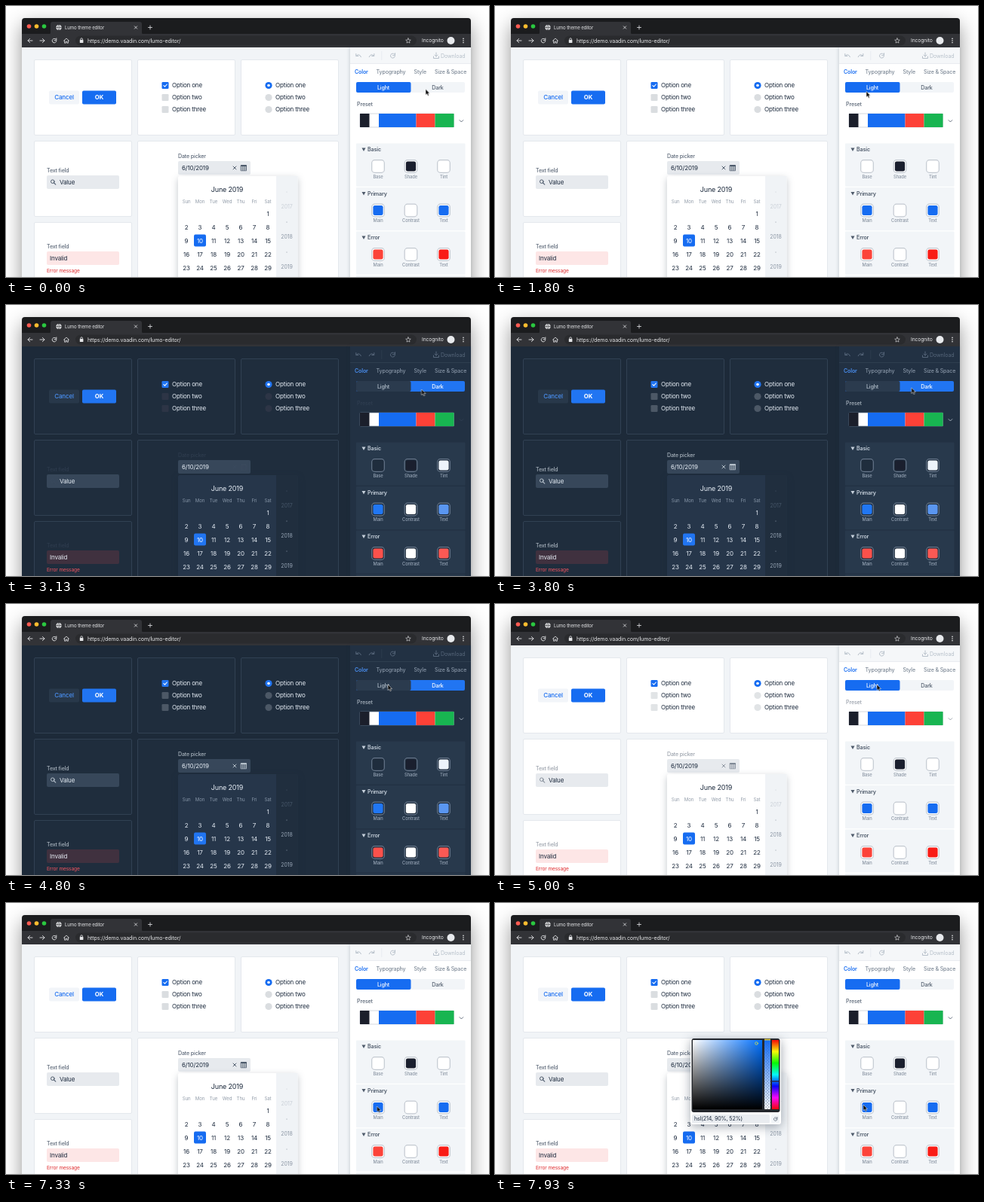
Animation, 640 px wide and 360 px high, one loop 8000 ms. Source, as an HTML page:

```html
<!DOCTYPE html>
<html lang="en">
<head>
<meta charset="utf-8">
<title>Theme editor</title>
<style>
@property --label { syntax: '<color>'; inherits: true; initial-value: rgba(27,43,65,.72); }
@property --box { syntax: '<color>'; inherits: true; initial-value: rgba(27,43,65,.16); }

html, body { margin: 0; width: 100%; height: 100%; overflow: hidden; background: #fff; }
svg { display: block; width: 640px; height: 360px; animation: theme 8s linear infinite, lag 8s linear infinite; }
text { font-family: Inter, Roboto, sans-serif; letter-spacing: -.02em; white-space: pre; }
.line { fill: none; stroke-linecap: round; stroke-linejoin: round; }
.window { filter: drop-shadow(0 9px 13px rgba(0,0,0,.42)); }
.side { filter: drop-shadow(-1px 0 2px rgba(20,35,55,.16)); }
.drop { filter: drop-shadow(0 3px 5px rgba(20,35,55,.26)); }
.popup { animation: popup 8s linear infinite; filter: drop-shadow(0 3px 7px rgba(20,35,55,.4)); }
.cursor { animation: cursor 8s linear infinite; }

@keyframes theme {
  0%, 39.124%, 62.5%, 100% {
    --page: #f1f4f7; --card: #fff; --edge: #e4e8ed; --text: #1c2a3d; --blue: #166cf1; --link: #166cf1;
    --quiet: #f2f5f9; --field: #e7eaee; --bad: #fde6e6; --error: #df2a2d; --cal: #fff; --years: #f0f3f6;
    --week: #929ca9; --year: #8a95a3; --far: #c9cfd7; --bar: #fff; --tool: #f5f7f9; --dim: #b7c0ca;
    --tab: #7b8795; --panel: #f2f5f8; --head: #4f5b6b; --ring: #c3c9d1; --cap: #8a95a3;
    --light: #166cf1; --lightText: #fff; --dark: #f2f5f8; --darkText: #4f5b6b;
    --base: #fff; --tint: #fff; --main: #166cf1; --ptext: #166cf1; --emain: #fc4339; --etext: #f91c16;
  }
  39.125%, 62.499% {
    --page: #1d2a39; --card: #1f2d3d; --edge: #314153; --text: #e6edf5; --blue: #2175f2; --link: #4a90f3;
    --quiet: #28384a; --field: #37475a; --bad: #40313f; --error: #f25560; --cal: #26364a; --years: #202e3e;
    --week: #8796a8; --year: #98a6b6; --far: #47576a; --bar: #223143; --tool: #223143; --dim: #56667a;
    --tab: #8795a6; --panel: #28394c; --head: #c6d0db; --ring: #66768a; --cap: #95a3b4;
    --light: #2b3b4e; --lightText: #b4c0cc; --dark: #2175f2; --darkText: #fff;
    --base: #1f2d3d; --tint: #eef4fb; --main: #2177f3; --ptext: #5a96f0; --emain: #fb514b; --etext: #fb5954;
  }
}
@keyframes lag {
  0%, 39.124%, 64.125%, 100% { --label: rgba(27,43,65,.72); --box: rgba(27,43,65,.16); }
  39.125% { --label: rgba(60,75,95,.5); --box: rgba(60,62,80,.5); }
  41.625%, 62.499% { --label: rgba(235,243,250,.68); --box: rgba(235,243,250,.22); }
  62.5% { --label: rgba(27,43,65,.44); --box: rgba(27,43,65,.13); }
}
@keyframes popup {
  0%, 94.124% { visibility: hidden; }
  94.125%, 100% { visibility: visible; }
}
@keyframes cursor {
  0%, 7.4% { transform: translate(556px,110.5px); }
  8.375%, 12.4% { transform: translate(555px,111px); }
  13.375%, 15% { transform: translate(550px,111px); animation-timing-function: ease-in-out; }
  22.5%, 24.1% { transform: translate(492px,113.5px); animation-timing-function: ease-in; }
  27.9% { transform: translate(522px,118px); animation-timing-function: ease-out; }
  30.9%, 34.9% { transform: translate(548px,112.5px); }
  35%, 43.4% { transform: translate(550.5px,112px); animation-timing-function: ease-in-out; }
  46.3% { transform: translate(554px,110px); animation-timing-function: ease-in-out; }
  54.1%, 55% { transform: translate(507px,106px); }
  55.9%, 67.4% { transform: translate(506px,107px); }
  67.5%, 73.4% { transform: translate(505.5px,107px); animation-timing-function: ease-in; }
  80.9% { transform: translate(494.5px,225.5px); animation-timing-function: ease-out; }
  84.1%, 86.6% { transform: translate(492.5px,260px); animation-timing-function: ease-in-out; }
  91.6%, 99.124% { transform: translate(491.5px,270px); }
  99.125%, 100% { transform: translate(488px,268px); }
}
</style>
</head>
<body>
<svg id="stage" viewBox="0 0 640 360">
  <defs>
    <linearGradient id="sat"><stop stop-color="#fff"/><stop offset="1" stop-color="#0070ff"/></linearGradient>
    <linearGradient id="val" x2="0" y2="1"><stop stop-opacity="0"/><stop offset="1"/></linearGradient>
    <linearGradient id="alpha" x2="0" y2="1"><stop stop-color="#166cf1"/><stop offset="1" stop-color="#166cf1" stop-opacity="0"/></linearGradient>
    <linearGradient id="hue" x2="0" y2="1"></linearGradient>
    <pattern id="check" width="4" height="4" patternUnits="userSpaceOnUse">
      <path fill="#fff" d="M0 0h4v4H0z"/><path fill="#c8ccd2" d="M0 0h2v2H0zM2 2h2v2H2z"/>
    </pattern>
  </defs>
</svg>
<script>
const stage = document.getElementById('stage');
const paint = c => /^(#|url|none)/.test(c) ? c : `var(--${c})`;

const rect = (x, y, w, h, fill, r = 0, more = '') =>
  `<rect x="${x}" y="${y}" width="${w}" height="${h}" rx="${r}" style="fill:${paint(fill)}" ${more}/>`;
const outline = (x, y, w, h, fill, stroke, r, sw = 1) =>
  `<rect x="${x}" y="${y}" width="${w}" height="${h}" rx="${r}" style="fill:${paint(fill)};stroke:${paint(stroke)};stroke-width:${sw}"/>`;
const dot = (x, y, r, fill) => `<circle cx="${x}" cy="${y}" r="${r}" style="fill:${paint(fill)}"/>`;
const line = (d, stroke, sw = 1) => `<path class="line" d="${d}" style="stroke:${paint(stroke)};stroke-width:${sw}"/>`;
const shape = (d, fill) => `<path d="${d}" style="fill:${paint(fill)}"/>`;
// y is the middle of the capitals
const text = (x, y, s, size, fill, weight = 400, anchor = 'start') =>
  `<text x="${x}" y="${y + size * .36}" font-size="${size}" font-weight="${weight}" text-anchor="${anchor}" style="fill:${paint(fill)}">${s}</text>`;
const mid = (x, y, s, size, fill, weight) => text(x, y, s, size, fill, weight, 'middle');
const cross = (x, y, r, c, sw) => line(`M${x - r} ${y - r}l${2 * r} ${2 * r}m0 ${-2 * r}l${-2 * r} ${2 * r}`, c, sw);
const reload = (x, y, r, c, sw) =>
  line(`M${x + r * .7} ${y - r * .7}A${r} ${r} 0 1 0 ${x + r} ${y + r * .2}M${x + r} ${y - r * 1.1}v${r}h${-r}`, c, sw);

function browser() {
  const ink = '#e4e5e7';
  let s = rect(21, 16, 595, 400, '#1b1c1e', 4, 'class="window"');
  s += shape('M56 38q3 0 3-3V24q0-3 3-3H177q3 0 3 3V35q0 3 3 3z', '#323337') + rect(21, 37, 595, 19, '#323337');
  ['#fc5b52', '#fdbc2f', '#2ac840'].forEach((c, i) => s += dot(30.5 + i * 10, 27, 2.8, c));
  s += dot(70, 28.5, 3.6, ink) + line('M66.5 28.5h7M70 25q-3 3.5 0 7M70 25q3 3.5 0 7', '#323337', .6);
  s += text(78, 28.5, 'Lumo theme editor', 6.1, ink) + cross(172, 28.5, 1.7, ink, .8) + line('M188.5 28.5h5M191 26v5', ink, .8);
  s += rect(92, 39.5, 452, 13, '#2a2b2e', 6.5);
  s += line('M35 46h-6m2.6-2.6l-2.6 2.6 2.6 2.6', ink, .9) + line('M45 46h6m-2.6-2.6l2.6 2.6-2.6 2.6', ink, .9);
  s += reload(64, 46, 2.8, ink, .9) + line('M76.5 46.2l3.5-3.2 3.5 3.2M77.6 45.6v3.6h1.6v-2h1.6v2h1.6v-3.6', ink, .8);
  s += rect(97.8, 45, 4.6, 4, ink, .5) + line('M98.8 45v-1a1.3 1.3 0 0 1 2.6 0v1', ink, .8);
  s += text(108, 46, 'https://demo.vaadin.com/lumo-editor/', 7.15, ink);
  s += line('M533 42.8l.9 2.2 2.4.2-1.8 1.6.5 2.3-2-1.2-2 1.2.5-2.3-1.8-1.6 2.4-.2z', ink, .6);
  s += text(551, 46, 'Incognito', 6.8, ink) + dot(589.5, 46, 5, '#e8eaed');
  [43.4, 46, 48.6].forEach(y => s += dot(606, y, .8, ink));
  return s + rect(21, 55, 595, 310, 'page');
}

function cards() {
  let s = '';
  [[37, 71, 129, 100], [174, 71, 129, 100], [311, 71, 129, 100], [37, 179, 129, 100], [174, 179, 266, 220], [37, 287, 129, 100]]
    .forEach(([x, y, w, h]) => s += outline(x + .5, y + .5, w, h, 'card', 'edge', 1.5));
  s += rect(57, 112.5, 40, 18, 'quiet', 2) + mid(77, 121.5, 'Cancel', 8, 'link', 500);
  s += rect(101, 112.5, 45, 18, 'blue', 2) + mid(123.5, 121.5, 'OK', 7.8, '#fff', 700);
  ['one', 'two', 'three'].forEach((n, i) => {
    const y = 105.5 + i * 16, fill = i ? 'box' : 'blue';
    s += rect(206.5, y - 4.5, 9, 9, fill, 1.3) + text(220, y, 'Option ' + n, 8, 'text');
    s += dot(348, y, 4.6, fill) + text(357, y, 'Option ' + n, 8, 'text');
  });
  s += line('M208.9 105.6l1.6 1.6 2.8-3.2', '#fff', 1.1) + dot(348, 105.5, 1.8, '#fff');

  s += text(54, 218, 'Text field', 7, 'label', 500) + rect(54, 225, 96, 18, 'field', 2);
  s += `<circle class="line" cx="61.8" cy="233.2" r="2.3" style="stroke:var(--label)"/>` + line('M63.6 235l2.2 2.2', 'label', 1.1);
  s += text(71, 234, 'Value', 8, 'text');
  s += text(54, 319, 'Text field', 7, 'label', 500) + rect(54, 326, 96, 18, 'bad', 2);
  s += text(58, 335, 'Invalid', 8, 'text') + text(54, 351.5, 'Error message', 6.6, 'error');

  s += text(228, 199, 'Date picker', 7.1, 'label', 500) + rect(228, 206, 96, 18, 'field', 2);
  s += text(233, 215, '6/10/2019', 8, 'text') + cross(303, 215, 2, 'label', 1);
  s += line('M311.5 211.8h7v7h-7z', 'label', .8) + rect(311.3, 211.3, 7.4, 2, 'label');
  return s + line('M311.5 215h7M311.5 217h7M313.8 213v5.6M316.2 213v5.6', 'label', .6);
}

function calendar() {
  let s = rect(228, 226, 158.5, 160, 'cal', 2, 'class="drop"') + rect(358, 226, 28.5, 160, 'years');
  s += mid(293, 243.5, 'June 2019', 9, 'text');
  ['Sun', 'Mon', 'Tue', 'Wed', 'Thu', 'Fri', 'Sat'].forEach((d, i) => s += mid(239 + i * 18, 259.5, d, 6.1, 'week'));
  s += rect(249, 303.5, 16, 16, 'blue', 2);
  for (let d = 1; d < 30; d++) {
    const i = d + 5;
    s += mid(239 + i % 7 * 18, 275.7 + (i / 7 | 0) * 18, d, 8, d === 10 ? '#fff' : 'text');
  }
  [2017, 2018, 2019].forEach((y, i) => {
    const c = i ? 'year' : 'far';
    s += dot(372, 247 + i * 40, .6, c) + mid(372, 266 + i * 40, y, 7, c);
  });
  return s;
}

function sidebar() {
  let s = rect(456, 55, 160, 310, 'bar', 0, 'class="side"') + rect(456, 55, 160, 21, 'tool') + rect(456, 76, 160, .8, 'edge');
  s += line('M463.8 63.5v3h3M464 66.3q4-4 6.4 1.4', 'dim', 1) + line('M487.8 63.5v3h-3M487.6 66.3q-4-4-6.4 1.4', 'dim', 1);
  s += rect(497.5, 60, .7, 12, 'edge') + reload(512.5, 66, 3, 'dim', 1);
  s += line('M570 62v5m-2-2l2 2 2-2M566.5 67v2.5h7V67', 'dim', 1) + text(576, 66, 'Download', 7.1, 'dim');
  [[462, 'Color'], [490.5, 'Typography'], [540.5, 'Style'], [568, 'Size &amp; Space']]
    .forEach(([x, n], i) => s += text(x, 87, n, 7.05, i ? 'tab' : 'link', i ? 500 : 600));
  s += rect(464, 101, 144, 14, 'dark', 2) + rect(464, 101, 72.5, 14, 'light', 2);
  s += mid(500, 108, 'Light', 7.1, 'lightText', 500) + mid(572, 108, 'Dark', 7.1, 'darkText', 500);

  s += text(465, 130, 'Preset', 7.1, 'label', 500) + outline(469, 143, 124.5, 18, '#fff', 'ring', 1, .7);
  [[469, 12.5, '#1b1f2b'], [494, 49.5, '#166cf1'], [543.5, 25, '#fd4137'], [568.5, 25, '#18b551']]
    .forEach(([x, w, c]) => s += rect(x, 143, w, 18, c));
  s += line('M601 151.6l2.4 2.4 2.4-2.4', 'label', .9);

  const groups = [
    ['Basic', 'Base', 'base', 'Shade', '#1a1f2e', 'Tint', 'tint'],
    ['Primary', 'Main', 'main', 'Contrast', '#fff', 'Text', 'ptext'],
    ['Error', 'Main', 'emain', 'Contrast', '#fff', 'Text', 'etext']
  ];
  groups.forEach(([name, ...items], i) => {
    const y = 182.5 + i * 58.5;
    s += rect(464, y, 144.5, 57.3, 'panel', 1) + shape(`M471.5 ${y + 6}h5l-2.5 4.4z`, 'head');
    s += text(479, y + 8, name, 7.1, 'head', 600);
    for (let k = 0; k < 3; k++) {
      const x = 493 + k * 43.5;
      s += outline(x - 8.3, y + 22.2, 16.6, 16.6, 'base', 'ring', 3.8, 1.2);
      s += rect(x - 6.6, y + 23.9, 13.2, 13.2, items[k * 2 + 1], 2.4);
      s += mid(x, y + 44.3, items[k * 2], 5.8, 'cap', 500);
    }
  });
  return s + rect(464, 358, 144.5, 10, 'panel', 1);
}

function picker() {
  let s = rect(259, 180, 120, 114, '#fff', 3) + rect(260.5, 180, 117, 98, '#25282d', 3);
  s += rect(262, 182, 92, 92, 'url(#sat)') + rect(262, 182, 92, 92, 'url(#val)');
  s += rect(357, 182, 8, 92, 'url(#check)') + rect(357, 182, 8, 92, 'url(#alpha)') + rect(367, 182, 9, 92, 'url(#hue)');
  s += `<circle class="line" cx="346.5" cy="186.5" r="1.8" style="stroke:#d6e34a;stroke-width:.8"/>`;
  s += rect(357, 180.6, 8, 1.8, '#d8c33c') + rect(366.5, 236, 10, 1.6, '#242a5c');
  s += rect(261, 281, 103, 11.5, '#e9ecf0', 1.5) + text(264, 286.7, 'hsl(214, 90%, 52%)', 7.2, '#1c2a3d');
  return `<g class="popup">${s}${rect(366, 281, 11, 11.5, '#f2f5f8', 1.5)}${reload(371.7, 287, 2.3, '#5c6777', .8)}</g>`;
}

const arrow = `<g class="cursor"><path d="M0 0V7.6L1.8 6.1 3 8.8 4.4 8.2 3.2 5.6H5.6Z" fill="#111" stroke="#fff" stroke-width=".6" stroke-opacity=".8"/></g>`;

stage.insertAdjacentHTML('beforeend', browser() + cards() + calendar() + sidebar() + picker() + arrow);
document.getElementById('hue').innerHTML =
  Array.from({ length: 7 }, (_, i) => `<stop offset="${i / 6}" stop-color="hsl(${i * 60},95%,50%)"/>`).join('');
</script>
</body>
</html>
```
